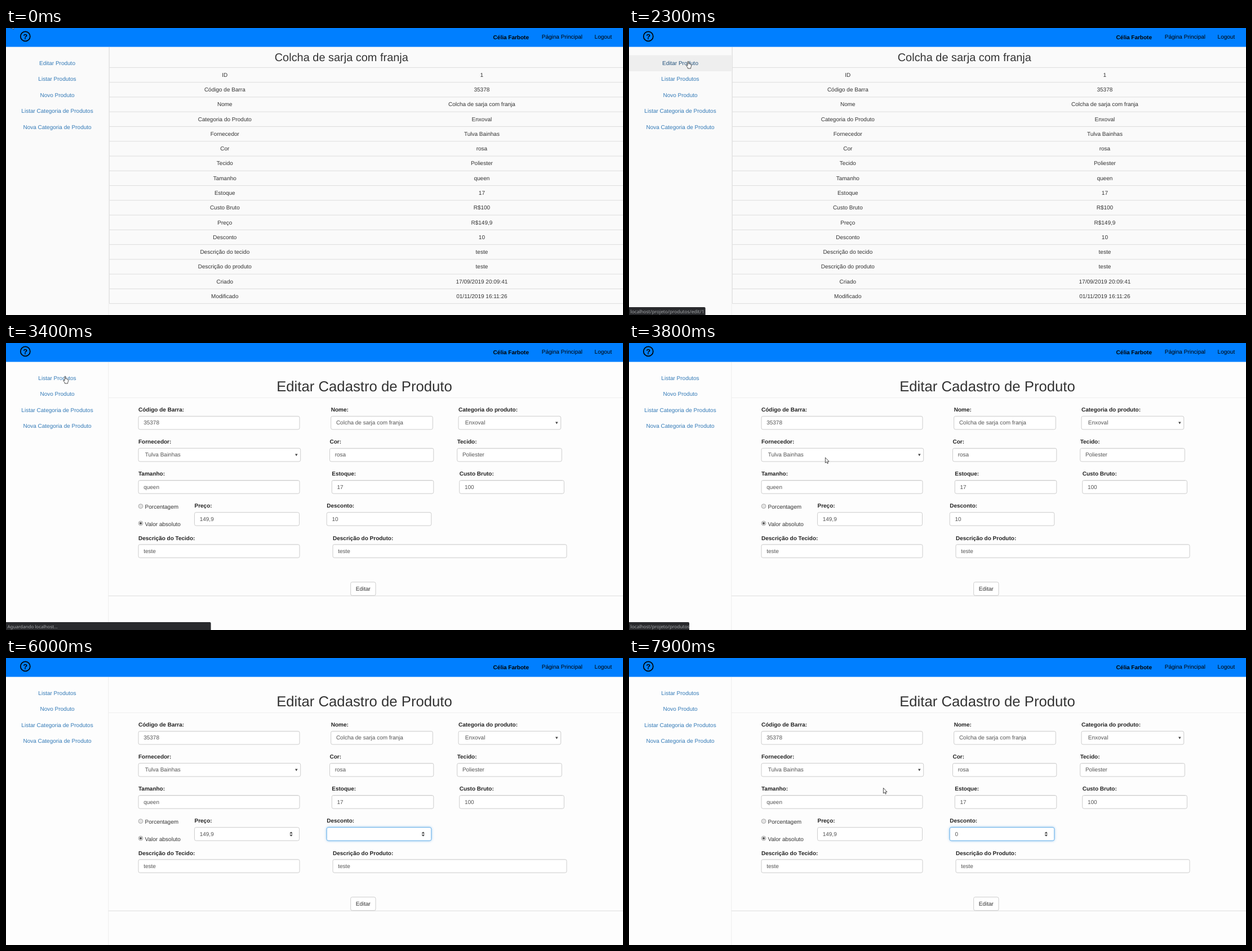
Recreate the animation shown at these times as an HTML page. Size 1095 by 511 pixels, loop 8 s.

```html
<!DOCTYPE html>
<html lang="pt-BR">
<head>
<meta charset="utf-8">
<title>Cadastro de produto</title>
<style>
html, body { margin: 0; width: 100%; height: 100%; overflow: hidden; background: #fdfdfd; }
svg { display: block; width: 1095px; height: 511px; }
text { font: 10px "Liberation Sans", Arial, sans-serif; fill: #333; text-rendering: geometricPrecision; white-space: pre; }
.mid { text-anchor: middle; }
.bold { font-weight: bold; fill: #222; }
.nav { fill: #000; }
.link { fill: #337ab7; }
.hover .link { fill: #23527c; }
.item rect { fill: none; }
.item.hover rect { fill: #eee; }
.value { fill: #555; }
.line { stroke: #ddd; fill: none; }
.soft { stroke: #eee; }
.box { fill: #fff; stroke: #ccc; }
.focus .box { stroke: #66afe9; filter: drop-shadow(0 0 2px rgba(102, 175, 233, .7)); }
.spin, .arrow { fill: #444; }
#button.hover .box { fill: #e6e6e6; stroke: #adadad; }
#status text { font-family: "Noto Sans", "Open Sans", sans-serif; fill: #a6a8ab; }
</style>
</head>
<body>
<svg viewBox="0 0 1095 511">
  <g id="details"></g>
  <g id="form"></g>
  <rect width="1095" height="33.6" fill="#007fff"/>
  <circle cx="34.3" cy="14.9" r="8.5" fill="none" stroke="#000" stroke-width="1.7"/>
  <text class="nav mid" x="34.3" y="19.5" style="font-size:13px;font-weight:bold">?</text>
  <text class="nav bold" x="864.6" y="20">Célia Farbote</text>
  <text class="nav" x="950.8" y="18.7">Página Principal</text>
  <text class="nav" x="1044.6" y="18.7">Logout</text>
  <g id="status">
    <path fill="#292a2d"/>
    <text x="2.5" y="507.6"></text>
  </g>
  <g id="pointer" stroke="#222" fill="#fff" stroke-linejoin="round">
    <path id="arrow" stroke-width=".8" d="M.4 .4V10L2.6 8 4 11.2 5.5 10.5 4.1 7.5H7Z"/>
    <path id="hand" stroke-width=".8" d="M-.9 8V1.2Q-.9 .3 0 .3T.9 1.2V4.6L2.3 4.8 3.7 5.2 5 5.8Q5.5 6.2 5.4 7V9.6L4.6 11.5V13H-.7V11.7L-3.2 8.3Q-3.6 7.2-2.5 7.1Z"/>
  </g>
</svg>
<script>
const $ = id => document.getElementById(id);
const text = (s, x, y, cls = '') => `<text class="${cls}" x="${x}" y="${y}">${s}</text>`;
const line = (d, cls = '') => `<path class="line ${cls}" d="${d}"/>`;
const rect = (x, y, w, h, cls) => `<rect class="${cls}" x="${x}" y="${y}" width="${w}" height="${h}" rx="2.8"/>`;

const links = ['Editar Produto', 'Listar Produtos', 'Novo Produto', 'Listar Categoria de Produtos', 'Nova Categoria de Produto'];
const LINK_TOP = 48.4, LINK_H = 28.5;
const sidebar = list => list.map((s, i) => {
  const y = LINK_TOP + i * LINK_H;
  return `<g class="item"><rect y="${y}" width="182" height="${LINK_H}"/>${text(s, 91, y + 17.3, 'link mid')}</g>`;
}).join('');

const product = 'Colcha de sarja com franja', supplier = 'Tulva Bainhas';
const rows = [
  ['ID', '1'], ['Código de Barra', '35378'], ['Nome', product], ['Categoria do Produto', 'Enxoval'],
  ['Fornecedor', supplier], ['Cor', 'rosa'], ['Tecido', 'Poliester'], ['Tamanho', 'queen'],
  ['Estoque', '17'], ['Custo Bruto', 'R$100'], ['Preço', 'R$149,9'], ['Desconto', '10'],
  ['Descrição do tecido', 'teste'], ['Descrição do produto', 'teste'],
  ['Criado', '17/09/2019 20:09:41'], ['Modificado', '01/11/2019 16:11:26']
];
$('details').innerHTML = '<rect width="1095" height="511" fill="#fafafa"/>' +
  sidebar(links) + line('M182.2 34V511', 'soft') + line('M183.4 34V490') +
  `<text class="mid" x="595.3" y="58.8" style="font-size:19.95px">${product}</text>` +
  rows.map(([name, value], i) => {
    const y = 70.4 + i * 26.27;
    return line(`M183 ${y}H1095`) + text(name, 388.3, y + 16.4, 'mid') + text(value, 844.4, y + 16.4, 'mid');
  }).join('') + line('M183 490.6H1095');

// label, value, row, left, right, kind
const fields = [
  ['Código de Barra:', '35378', 0, 235, 521],
  ['Nome:', product, 0, 576.7, 757.3],
  ['Categoria do produto:', 'Enxoval', 0, 803, 984.7, 'select'],
  ['Fornecedor:', supplier, 1, 235, 522.7, 'select'],
  ['Cor:', 'rosa', 1, 574.5, 758.8],
  ['Tecido:', 'Poliester', 1, 800.7, 986.3],
  ['Tamanho:', 'queen', 2, 235, 521],
  ['Estoque:', '17', 2, 578.3, 758.8],
  ['Custo Bruto:', '100', 2, 804.7, 990.4],
  ['Preço:', '149,9', 3, 334.5, 520.5, 'price'],
  ['Desconto:', '', 3, 569.2, 754.8, 'discount'],
  ['Descrição do Tecido:', 'teste', 4, 235, 521],
  ['Descrição do Produto:', 'teste', 4, 580, 995]
];
const FIELD_H = 23.6, rowTop = row => 130.3 + row * 57.1;
const spinner = (x, y) => `<path class="spin" d="M${x - 2.8} ${y - 1}l2.8 -3.2 2.8 3.2zm0 2l2.8 3.2 2.8 -3.2z"/>`;
const field = ([label, value, row, x, right, kind = '']) => {
  const y = rowTop(row), select = kind === 'select';
  return text(label, x, y - 8.2, 'bold') + `<g id="${select ? '' : kind}">` +
    rect(x, y, right - x, FIELD_H, 'box') +
    (select ? `<path class="arrow" d="M${right - 9.7} ${y + 10.2}h4.6l-2.3 4z"/>`
      : kind ? spinner(right - 14.5, y + 11.9) : line(`M${x + 2} ${y + 1}H${right - 2}`, 'soft')) +
    text(value, x + (select ? 11.8 : 9.2), y + 15, 'value') + '</g>';
};
const radio = (label, y, on) => `<circle cx="239" cy="${y}" r="3.9" fill="#e4e4e4" stroke="#999" stroke-width=".8"/>` +
  (on ? `<circle cx="239" cy="${y}" r="2" fill="#555"/>` : '') + text(label, 246.6, y + 4.6);
$('form').innerHTML = '<rect width="1095" height="511" fill="#fdfdfd"/>' +
  sidebar(links.slice(1)) + line('M181.7 34V511', 'soft') +
  '<text class="mid" x="636" y="85.6" style="font-size:25.72px">Editar Cadastro de Produto</text>' +
  line('M182 97.4H1095', 'soft') + line('M182 450.2H1095') +
  fields.map(field).join('') + radio('Porcentagem', 290.6) + radio('Valor absoluto', 321, true) +
  `<g id="button">${rect(611.7, 425.7, 44.3, 24, 'box')}${text('Editar', 633.8, 441, 'mid')}</g>` +
  '<rect id="selection" x="578" y="307" width="11.2" height="12" fill="#3297fd"/>' +
  text('10', 578.4, 316.6, 'value" id="amount') +
  '<rect id="caret" y="308" width=".8" height="11" fill="#444"/>';

// time, x, y of the pointer's hot spot
const path = [
  [0, 8.5, -8.6], [500, 345, 183], [1200, 345, 183], [1300, 327, 175.3], [2100, 105, 61], [2300, 105, 59],
  [3500, 105, 59], [4000, 480, 282], [4100, 480, 282], [4200, 530, 289], [4400, 650, 313], [4500, 640, 313],
  [5000, 450, 313], [6600, 450, 313], [6700, 545, 315], [6800, 660, 313], [6900, 741, 318],
  [7000, 690, 457], [7100, 636, 437], [7200, 636, 437], [7900, 451, 231], [8000, 451, 231]
];
const pointerAt = t => {
  const i = path.findIndex(p => p[0] > t), [t0, x0, y0] = path[i - 1], [t1, x1, y1] = path[i];
  const k = (t - t0) / (t1 - t0), e = t1 - t0 >= 500 ? k * k * (3 - 2 * k) : k;
  return [x0 + (x1 - x0) * e, y0 + (y1 - y0) * e];
};

const show = (el, on) => { el.style.display = on ? '' : 'none'; };
const during = (t, a, b) => t >= a && t < b;
const items = ['details', 'form'].map(id => [...$(id).querySelectorAll('.item')]);

function setStatus(t) {
  const [bar, label] = $('status').children;
  const waiting = during(t, 3300, 3600);
  const width = t < 3400 ? 135.6 : waiting ? 363.6 : 107;
  show($('status'), during(t, 2200, 4200));
  $('status').style.opacity = during(t, 2200, 2300) || t >= 4000 ? .5 : 1;
  bar.setAttribute('d', `M0 497H${width - 2}q2 0 2 2V511H0z`);
  label.textContent = waiting ? 'Aguardando localhost...' : 'localhost/projeto/produtos' + (t < 3300 ? '/edit/1' : '');
  label.style.fontSize = waiting ? '8px' : '8.3px';
}

function draw(now) {
  const t = Math.floor(now % 8000 / 100) * 100;
  const editing = t >= 3400, [x, y] = pointerAt(t);
  const inside = (l, r, top, h) => x >= l && x <= r && y >= top && y <= top + h;
  show($('details'), !editing);
  show($('form'), editing);
  setStatus(t);

  const current = items[+editing];
  const index = x < 182 ? Math.floor((y - LINK_TOP) / LINK_H) : -1;
  const active = !during(t, 3400, 3600);
  current.forEach((el, i) => el.classList.toggle('hover', active && i === index));

  const onButton = editing && inside(612, 656, 426, 24);
  const onPrice = inside(334, 521, rowTop(3), FIELD_H);
  const typing = editing && fields.some(f => f[5] !== 'select' && inside(f[3], f[4] - 20, rowTop(f[2]), FIELD_H));
  const hand = onButton || index >= 0 && index < current.length;
  show($('pointer'), !typing && !during(t, 4400, 6700));
  show($('hand'), hand);
  show($('arrow'), !hand);
  $('pointer').setAttribute('transform', `translate(${x} ${y})`);
  $('button').classList.toggle('hover', onButton);

  const selected = during(t, 4700, 5500);
  $('discount').classList.toggle('focus', t >= 4600);
  show($('discount').querySelector('.spin'), t >= 4400);
  show($('price').querySelector('.spin'), onPrice);
  show($('selection'), selected);
  $('amount').textContent = t < 5500 ? '10' : t < 6300 ? '' : '0';
  $('amount').style.fill = selected ? '#fff' : '';
  show($('caret'), during(t, 5500, 6000) || t >= 6300 && (t - 6300) % 1000 < 500);
  $('caret').setAttribute('x', t < 6300 ? 578.2 : 584);
}

const start = performance.now();
function tick() {
  draw(performance.now() - start);
  requestAnimationFrame(tick);
}
tick();
</script>
</body>
</html>
```
